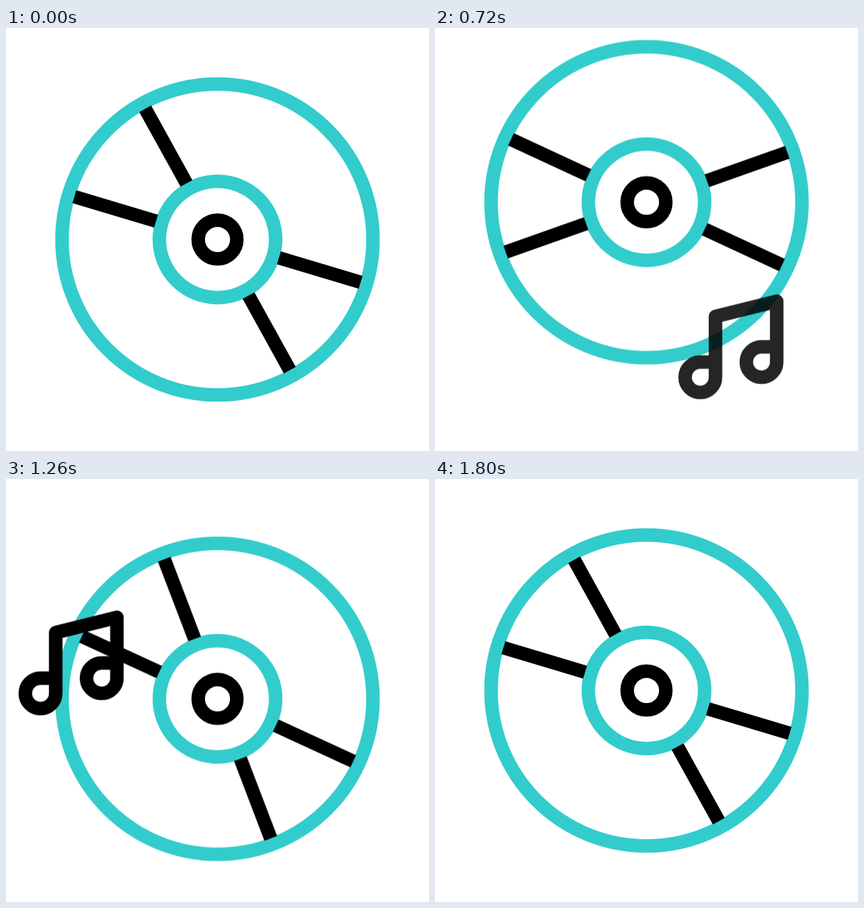
Write an HTML page without scripts that moves like this. It is 640 by 640 pixels and loops after 2400 ms.

```html
<!DOCTYPE html>
<html lang="en">
<head>
<meta charset="utf-8">
<title>Bouncing disc</title>
<style>
  html, body { margin: 0; width: 100%; height: 100%; overflow: hidden; background: #fff; }
  svg { display: block; width: 100vw; height: 100vh; }

  .line { fill: none; stroke: #000; stroke-width: 20.5; }
  .teal { stroke: #3cc; }
  .note { stroke-linecap: round; stroke-linejoin: round; }

  .disc, .spokes, .rise, .fade { animation: 2.4s linear infinite backwards; }
  .disc { animation-name: bounce; }
  .spokes { animation-name: spin; }
  .rise { animation-name: rise; }
  .fade { animation-name: fade; }
  .late .rise, .late .fade { animation-delay: .46s; }

  @keyframes bounce {
    0% { transform: translateY(0); animation-timing-function: cubic-bezier(.333, .1, .667, .87); }
    28.333% { transform: translateY(-58px); animation-timing-function: cubic-bezier(.333, 0, .667, 1); }
    49.167% { transform: translateY(24px); animation-timing-function: cubic-bezier(.333, 0, .667, 1); }
    60.833% { transform: translateY(-32.2px); animation-timing-function: cubic-bezier(.333, 0, .667, 1); }
    75%, 100% { transform: translateY(0); }
  }

  /* wind back a little, then a full turn */
  @keyframes spin {
    0% { transform: rotate(0deg); animation-timing-function: cubic-bezier(.333, 0, .667, 1); }
    25% { transform: rotate(-54deg); animation-timing-function: cubic-bezier(.333, .063, .667, .97); }
    75%, 100% { transform: rotate(360deg); }
  }

  @keyframes rise {
    0%, 22.667% { transform: translateY(107.2px); animation-timing-function: cubic-bezier(.333, 0, .667, 1); }
    50.667%, 100% { transform: translateY(-107.3px); }
  }

  @keyframes fade {
    0%, 22.917% { opacity: 0; }
    31.25%, 41.667% { opacity: 1; }
    50%, 100% { opacity: 0; }
  }
</style>
</head>
<body>
<svg viewBox="0 0 640 640">
  <defs>
    <path id="pair" d="M97 0H226M-97 0H-226"/>
    <g id="note" class="fade">
      <path class="line note rise" d="M517 343L424.4 366V458a23 23 0 1 1 -23 -23h23M517 343V435a23 23 0 1 1 -23 -23h23"/>
    </g>
  </defs>

  <g transform="translate(320 320)">
    <g class="disc line">
      <circle class="teal" r="235.25"/>
      <circle class="teal" r="88"/>
      <circle r="29.25"/>
      <g class="spokes">
        <use href="#pair" transform="rotate(16.65)"/>
        <use href="#pair" transform="rotate(61.05)"/>
      </g>
    </g>
  </g>

  <g class="fade">
    <path class="line note rise" d="M517 343L424.4 366V458a23 23 0 1 1 -23 -23h23M517 343V435a23 23 0 1 1 -23 -23h23"/>
  </g>
  <g class="late" transform="translate(-349.2 -170.7)">
    <g class="fade">
      <path class="line note rise" d="M517 343L424.4 366V458a23 23 0 1 1 -23 -23h23M517 343V435a23 23 0 1 1 -23 -23h23"/>
    </g>
  </g>
</svg>
</body>
</html>
```
